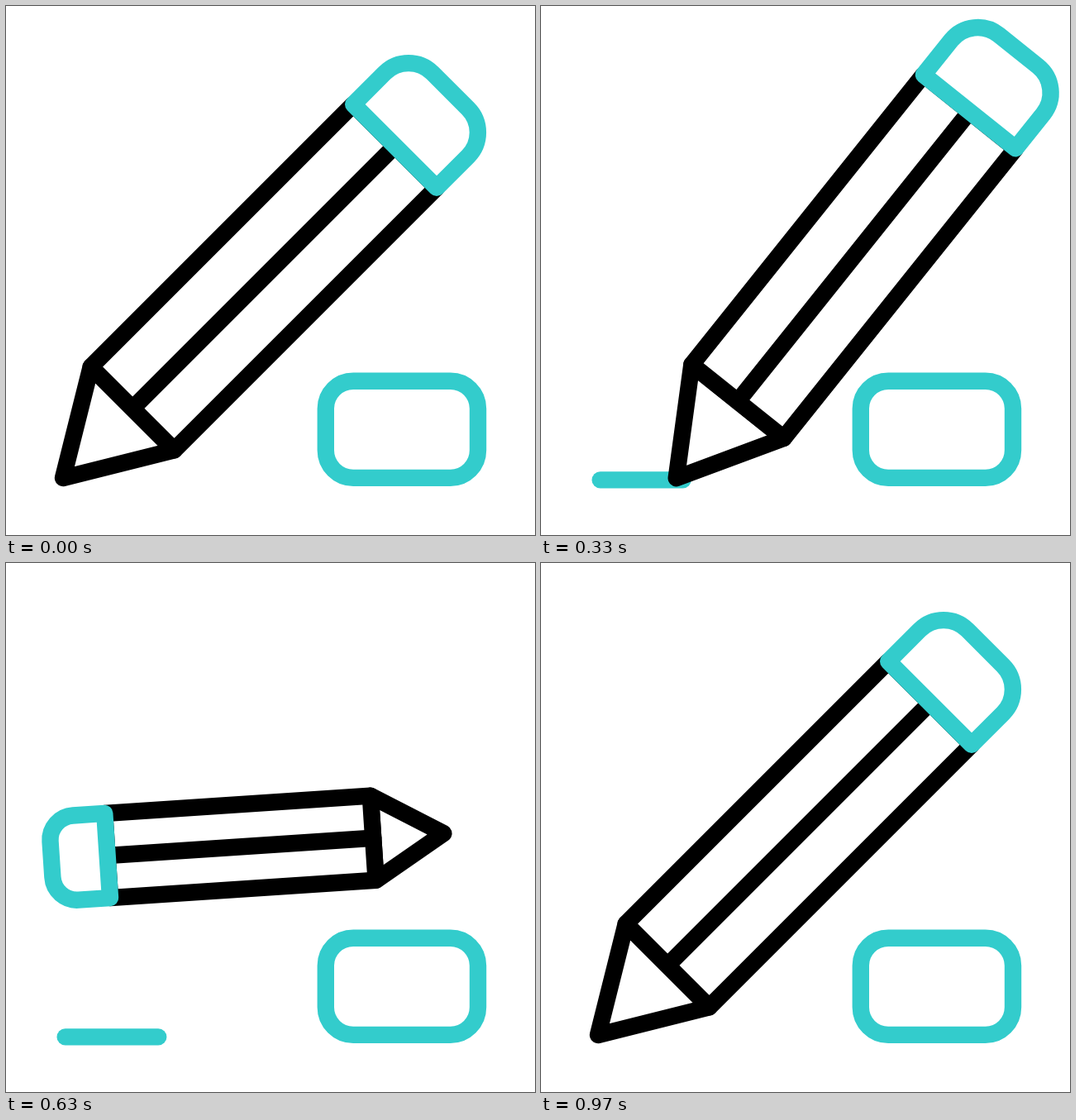
Recreate the animation shown at these times as an HTML page with a canvas. Size 640 by 640 pixels, loop 1670 ms.

```html
<!DOCTYPE html>
<html lang="en">
<head>
<meta charset="utf-8">
<title>Pencil</title>
<style>
  html, body { margin: 0; width: 100%; height: 100%; overflow: hidden; background: #fff; }
  canvas { display: block; width: 100%; height: 100%; }
</style>
</head>
<body>
<canvas id="stage" width="640" height="640"></canvas>
<script>
const ctx = document.getElementById('stage').getContext('2d');
const LOOP = 1670, STEP = 1000 / 30, LAST = 29;
const TEAL = '#33cccc', BLACK = '#000', STROKE = 20.4;

// Pencil shape along its own axis, measured from the pivot
const TIP = -355, NECK = -236, BAND = 213, END = 307.5, HALF = 71.3;

// Poses: x, y, angle in degrees, scale
const REST = [320, 320, 45, 1];
const DRAWN = [395.2, 290.2, 52.28, 1];
const SPIN = [
  [13, DRAWN],
  [16, [369.3, 296.4, 95.05, 0.884]],
  [20, [250, 357, 215, 0.68]],
  [22, [258, 354.2, 274.55, 0.73]],
  [25, [335.6, 326.8, 367.86, 0.8775]],
  [LAST, [320, 320, 405, 1]]
];

const ease = (n, from, to) => {
  const u = Math.min(1, Math.max(0, (n - from) / (to - from)));
  return u * u * (3 - 2 * u);
};
const mix = (a, b, k) => a + (b - a) * k;

function slope(i, c) {
  if (i === 0 || i === SPIN.length - 1) return 0;
  const [t0, a] = SPIN[i - 1], [t1, b] = SPIN[i + 1];
  return (b[c] - a[c]) / (t1 - t0);
}

// Smooth curve through the spin poses
function spinPose(n) {
  let i = 0;
  while (i < SPIN.length - 2 && n >= SPIN[i + 1][0]) i++;
  const [t0, a] = SPIN[i], [t1, b] = SPIN[i + 1];
  const d = t1 - t0, u = Math.min(1, (n - t0) / d);
  const k = u * u * (3 - 2 * u);
  return a.map((v, c) => mix(v, b[c], k) +
    d * u * (1 - u) * ((1 - u) * slope(i, c) - u * slope(i + 1, c)));
}

function pose(n) {
  if (n >= 13) return spinPose(n);
  const k = n > 0 ? ease(n, -0.3, 13) : 0;
  return REST.map((v, c) => mix(v, DRAWN[c], k));
}

function shape(color, build, fill) {
  ctx.beginPath();
  build();
  if (fill) {
    ctx.fillStyle = '#fff';
    ctx.fill();
  }
  ctx.strokeStyle = color;
  ctx.stroke();
}

function poly(points, close) {
  points.forEach(([x, y]) => ctx.lineTo(x, y));
  if (close) ctx.closePath();
}

function drawPencil([x, y, angle, scale]) {
  ctx.save();
  ctx.translate(x, y);
  ctx.rotate(-angle * Math.PI / 180);
  ctx.scale(scale, scale);
  ctx.lineWidth = STROKE / scale;
  shape(BLACK, () => poly([[TIP, 0], [NECK, -HALF], [NECK, HALF]], true), true);
  shape(BLACK, () => poly([[NECK, -HALF], [BAND, -HALF], [BAND, HALF], [NECK, HALF]], true), true);
  shape(BLACK, () => poly([[NECK, 0], [BAND, 0]]));
  shape(TEAL, () => ctx.roundRect(BAND, -HALF, END - BAND, 2 * HALF, [0, 41, 41, 0]), true);
  ctx.restore();
}

function drawLine(n) {
  const head = ease(n, 0.5, 12.5), tail = ease(n, 19.5, 23.2);
  if (head <= tail) return;
  const at = k => [mix(71.7, 184.2, k), 573.4];
  shape(TEAL, () => poly([at(tail), at(head)]));
}

function render(now) {
  const n = Math.min(LAST, Math.floor((now % LOOP + 4) / STEP));
  ctx.fillStyle = '#fff';
  ctx.fillRect(0, 0, 640, 640);
  ctx.lineWidth = STROKE;
  ctx.lineCap = ctx.lineJoin = 'round';
  shape(TEAL, () => ctx.roundRect(386.8, 453.8, 184.2, 117.1, 33.3));
  drawLine(n);
  drawPencil(pose(n));
}

const start = performance.now();
function tick() {
  render(performance.now() - start);
  requestAnimationFrame(tick);
}
tick();
</script>
</body>
</html>
```
